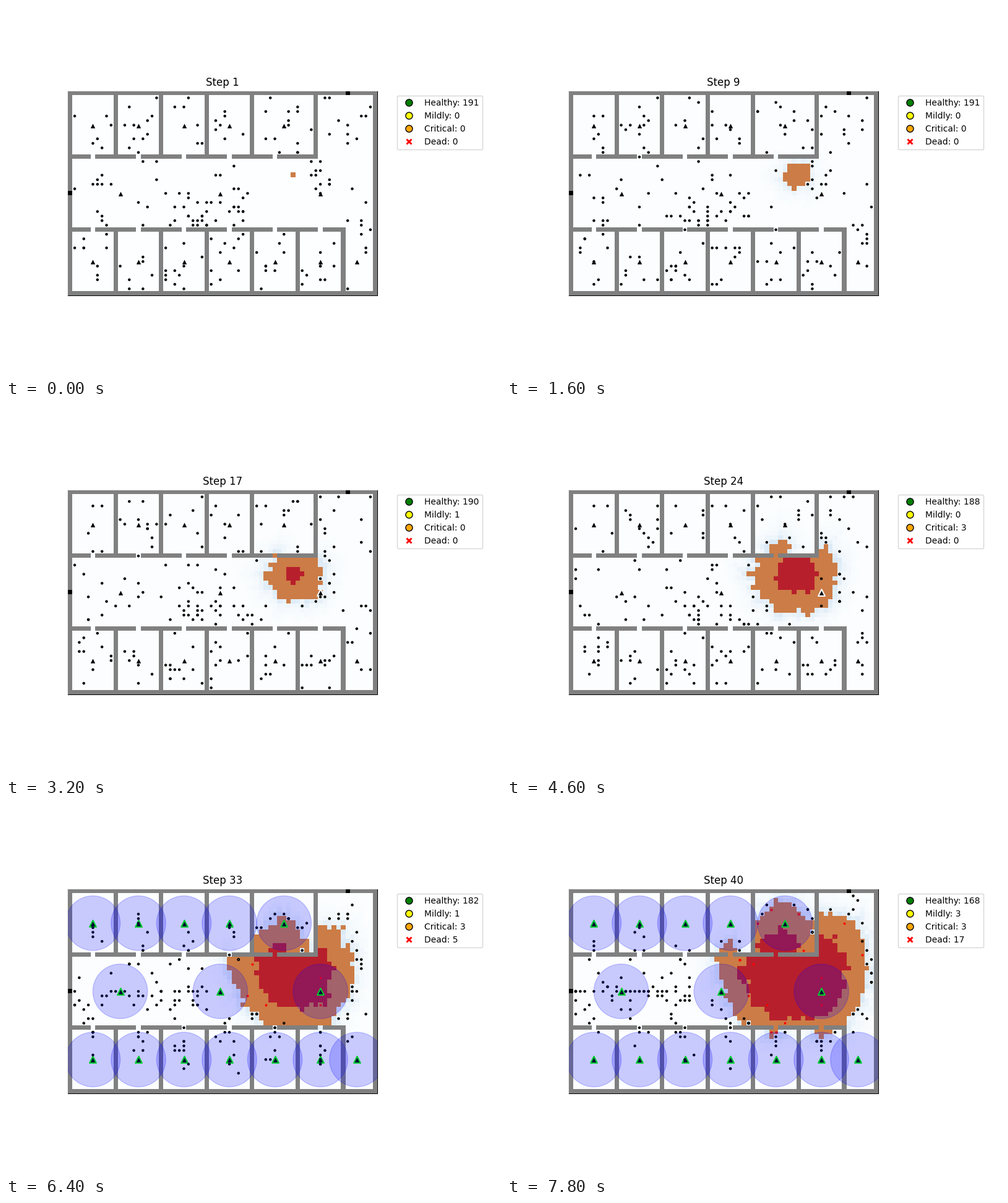
Animation, 800 px wide and 600 px high, one loop 8 s. Source, as a matplotlib script:

```python
import matplotlib.pyplot as plt
import numpy as np
from matplotlib.animation import FuncAnimation
from matplotlib.lines import Line2D

ROWS, COLS, STEPS = 45, 68, 40
ALARM = 25
BURN_LAG = 11
EXITS = [(22, 0), (0, 61)]
IGNITION = (18, 49)

# Columns of the walls between the rooms above and below the corridor
UPPER = [0, 10, 20, 30, 40, 54, 67]
LOWER = [0, 10, 20, 30, 40, 50, 60, 67]
UPPER_PEOPLE = [6, 11, 6, 7, 14, 11]
LOWER_PEOPLE = [9, 7, 11, 10, 9, 10, 4]
# Corridor groups: first row, last row, first column, last column, people
CROWDS = [(15, 29, 1, 41, 38), (22, 29, 26, 38, 20),
          (15, 22, 53, 58, 12), (20, 30, 61, 66, 6)]

PAPER = np.array([252, 254, 255]) / 255
SMOKE = np.array([218, 233, 246]) / 255
FLAME = np.array([204, 124, 70]) / 255
BURNT = np.array([184, 31, 44]) / 255

rng = np.random.default_rng(12)


def centers(edges):
    return [(a + b) // 2 for a, b in zip(edges, edges[1:])]


SPRINKLERS = ([(c, 7) for c in centers(UPPER)[:-1]]
              + [(c, 22) for c in (11, 33, 55)]
              + [(c, 37) for c in centers(LOWER)])
NEIGHBOURS = [(dr, dc) for dr in (-1, 0, 1) for dc in (-1, 0, 1)]


def build_walls():
    wall = np.zeros((ROWS, COLS), bool)
    wall[[0, -1], :] = True
    wall[:, [0, -1]] = True
    wall[14, :55] = True
    wall[30, :61] = True
    wall[:15, UPPER[1:-1]] = True
    wall[30:, LOWER[1:-1]] = True
    wall[14, 5:50:10] = False
    wall[30, 5:60:10] = False
    for cell in EXITS:
        wall[cell] = False
    return wall


def spread(cost, seeds, first=0.0, up=1.0, down=1.0):
    """Arrival time at each cell, spreading from the seeds."""
    time = np.full((ROWS, COLS), np.inf)
    for cell in seeds:
        time[cell] = first
    for _ in range(160):
        for dr, dc in NEIGHBOURS:
            length = np.hypot(dr * (down if dr > 0 else up), dc)
            if length:
                moved = np.roll(time, (dr, dc), (0, 1)) + cost * length
                time = np.minimum(time, moved)
    return time


wall = build_walls()
to_exit = spread(np.where(wall, np.inf, 1.0), EXITS)
fuel = 2.35 * rng.uniform(0.55, 1.75, (ROWS, COLS))
ignite = spread(np.where(wall, np.inf, fuel), [IGNITION], 1.0, 0.92, 1.1)


def crowd(top, bottom, left, right, count):
    cells = []
    while len(cells) < count:
        cell = (int(rng.integers(top, bottom + 1)),
                int(rng.integers(left, right + 1)))
        if not wall[cell]:
            cells.append(cell)
    return cells


def populate():
    people = []
    for edges, counts, top in ((UPPER, UPPER_PEOPLE, 1),
                               (LOWER, LOWER_PEOPLE, 31)):
        for a, b, count in zip(edges, edges[1:], counts):
            people += crowd(top, top + 12, a + 1, b - 1, count)
    for group in CROWDS:
        people += crowd(*group)
    return people


def tally(step):
    """Numbers of hurt, mildly hurt and dead people."""
    keys = [16, 17, 24, 27, 33, 40]
    hurt = np.interp(step, keys, [0, 1, 3, 3, 9, 23])
    mild = np.interp(step, keys, [0, 1, 0, 0, 1, 3])
    dead = np.interp(step, keys, [0, 0, 0, 2, 5, 17])
    return [int(v + 1e-6) for v in (hurt, mild, dead)]


def next_cell(cell, step):
    r, c = cell
    alarm = step >= ALARM
    options = [(r + dr, c + dc) for dr, dc in NEIGHBOURS]
    options = [p for p in options
               if not wall[p] and (alarm or to_exit[p] > 0)]
    if ignite[cell] < step + 1:
        return max(options, key=lambda p: ignite[p])
    options = [p for p in options if ignite[p] >= step + 1]
    if alarm and rng.random() < 0.55:
        return min(options, key=lambda p: to_exit[p] + rng.random())
    return options[rng.integers(len(options))]


def simulate():
    people = populate()
    victims, history = [], []
    for step in range(1, STEPS + 1):
        if step > 1:
            for i, cell in enumerate(people):
                if i not in victims and to_exit[cell] > 0:
                    people[i] = next_cell(cell, step)
        hurt, mild, dead = tally(step)
        while len(victims) < hurt:
            fit = [i for i in range(len(people))
                   if i not in victims and to_exit[people[i]] > 0]
            victims.append(min(fit, key=lambda i: ignite[people[i]]))
        colors = ["green"] * len(people)
        for rank, i in enumerate(victims):
            colors[i] = ("red" if rank < dead else
                         "orange" if rank < hurt - mild else "yellow")
        counts = (len(people) - hurt, mild, hurt - mild - dead, dead)
        shown = [(c, r, color) for (r, c), color in zip(people, colors)
                 if to_exit[r, c] > 0]
        history.append((shown, counts))
    return history


def floor_image(step):
    ahead = np.clip(ignite - step, 0, 99)
    haze = np.exp(-ahead / 3.5)[..., None] * min(1, (step - 1) / 12)
    img = PAPER + (SMOKE - PAPER) * haze
    img[ignite <= step] = FLAME
    img[ignite + BURN_LAG <= step] = BURNT
    img[wall] = 128 / 255
    for cell in EXITS:
        img[cell] = 0
    return img


history = simulate()

fig, ax = plt.subplots(figsize=(8, 6), dpi=100)
fig.subplots_adjust(right=0.75)
ax.set_xticks([])
ax.set_yticks([])
floor = ax.imshow(floor_image(1), interpolation="nearest", zorder=3)
title = ax.set_title("Step 1")

heads = ax.scatter(*zip(*SPRINKLERS), s=60, marker="^", c="black",
                   edgecolors="white", linewidths=1.5, zorder=4)
dots = ax.scatter([], [], s=4, edgecolors="black", linewidths=1.2, zorder=5)
crosses = ax.scatter([], [], s=4, marker="x", c="red", linewidths=1.5,
                     zorder=6)
sprays = [ax.add_patch(plt.Circle(p, 6, color="blue", alpha=0.2, zorder=7))
          for p in SPRINKLERS]
ax.set_xlim(-0.5, COLS - 0.5)
ax.set_ylim(ROWS - 0.5, -0.5)

NAMES = ["Healthy", "Mildly", "Critical", "Dead"]
LOOKS = [("o", "green", "black"), ("o", "yellow", "black"),
         ("o", "orange", "black"), ("X", "red", "white")]
handles = [Line2D([0], [0], marker=m, color="w", markerfacecolor=face,
                  markeredgecolor=edge, markersize=8)
           for m, face, edge in LOOKS]
legend = ax.legend(handles, [f"{n}: {v}" for n, v in
                             zip(NAMES, history[0][1])],
                   loc="upper left", bbox_to_anchor=(1.05, 1))


def place(scatter, points):
    scatter.set_offsets(np.array(points, float).reshape(-1, 2))


def draw(frame):
    step = frame + 1
    shown, counts = history[frame]
    floor.set_data(floor_image(step))
    title.set_text(f"Step {step}")
    living = [p for p in shown if p[2] != "red"]
    place(dots, [p[:2] for p in living])
    dots.set_facecolor([p[2] for p in living])
    place(crosses, [p[:2] for p in shown if p[2] == "red"])
    active = step >= ALARM
    heads.set_edgecolor("lime" if active else "white")
    for spray in sprays:
        spray.set_visible(active)
    for text, name, value in zip(legend.get_texts(), NAMES, counts):
        text.set_text(f"{name}: {value}")
    return floor, title, heads, dots, crosses, legend, *sprays


anim = FuncAnimation(fig, draw, frames=STEPS, interval=200, repeat=True,
                     repeat_delay=0, init_func=lambda: draw(0), blit=False)
plt.show()
```
